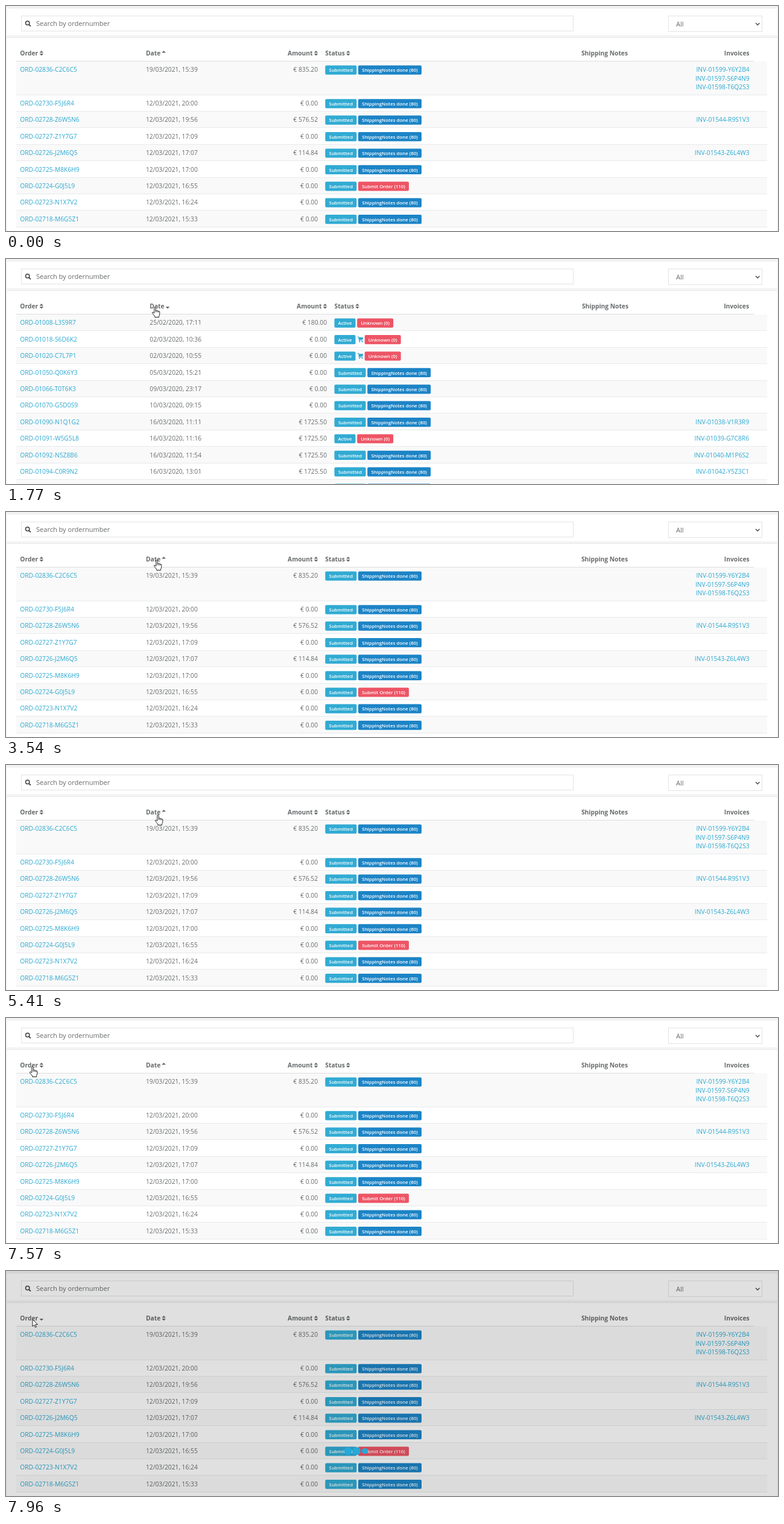
Write an HTML page that moves like this. It is 1280 px wide and 373 px high and loops after 8 s.

```html
<!DOCTYPE html>
<html lang="en">
<head>
<meta charset="utf-8">
<title>Orders</title>
<style>
  html, body { margin: 0; width: 100%; height: 100%; overflow: hidden; background: #f3f3f4; }
  svg { display: block; font: 10.25px "Open Sans", sans-serif; fill: #676a6c; }
  .end { text-anchor: end; }
  .head { font-weight: 700; }
  .link { fill: #2ba8d0; }
  .badge { font-size: 7.85px; font-weight: 600; fill: #fff; text-anchor: middle; }
  .field { font-size: 11.04px; }
  .box { fill: #fff; stroke: #e2e3e4; }
  .cursor path { fill: #fff; stroke: #222; stroke-width: 1; stroke-linejoin: round; }
</style>
</head>
<body>
<svg width="1280" height="373" viewBox="0 0 1280 373">
  <rect width="1280" height="373" fill="#f3f3f4"/>
  <path d="M1.5 4H1278.5V48.5H1.5ZM1.5 53H1278.5V373H1.5Z" fill="#fff"/>
  <path d="M1.5 3.5H1278.5M1.5 52.5H1278.5" stroke="#e7eaec"/>
  <rect class="box" x="25.5" y="16.5" width="915" height="25"/>
  <rect class="box" x="1098.5" y="16.5" width="155" height="26"/>
  <g fill="none" stroke="#4a4c4e">
    <circle cx="35.7" cy="28.3" r="3.2" stroke-width="1.6"/>
    <path d="M38 30.7L41 33.6" stroke-width="2"/>
    <path d="M1243 28.3L1246.2 31.5L1249.4 28.3" stroke-width="1.5"/>
  </g>
  <text class="field" x="50" y="33">Search by ordernumber</text>
  <text class="field" x="1111" y="34">All</text>
  <g id="table"></g>
  <g id="loader">
    <rect width="1280" height="373" opacity=".12" fill="#000"/>
    <g fill="#25a9d9">
      <circle cx="567" cy="298.5"/><circle cx="581" cy="298.5"/><circle cx="595" cy="298.5"/>
    </g>
  </g>
  <g id="cursor" class="cursor">
    <path id="arrow" d="M0 0V12L2.8 9.4L4.6 13.5L6.4 12.7L4.6 8.7H8.5Z"/>
    <path id="hand" d="M-1.2 1.2Q0 -.6 1.2 1.2V6.2Q2.4 5.4 3.4 6.6Q4.8 6 5.6 7.4Q7.6 6.8 7.8 9V12Q7.6 14 6.6 15.5V17.5H-.2V16Q-2.5 13.5 -4.6 10.3Q-4.6 8.6 -2.8 9.4L-1.2 10.8ZM1.2 6.2V9M3.5 6.8V9.3M5.6 7.5V9.5"/>
  </g>
</svg>
<script>
const LOOP = 8000, STEP = 77, ROW = 27.4, LINE = 14.1, LOADING = 7640;
const $ = id => document.getElementById(id);

// label, width, colour
const badges = {
  S: ['Submitted', 52, '#31abd3'],
  A: ['Active', 35, '#31abd3'],
  N: ['ShippingNotes done (80)', 105, '#1c84c6'],
  R: ['Submit Order (110)', 84, '#ed5565'],
  U: ['Unknown (0)', 60, '#ed5565']
};

const newest = {
  date: 232, amount: 517, status: 529.3, notes: 1031, invoice: 1232.7,
  rows: `02836-C2C6C5|19/03/2021, 15:39|835.20|SN|01599-Y6Y2B4 01597-S6P4N9 01598-T6Q2S3
02730-F5J6R4|12/03/2021, 20:00|0.00|SN
02728-Z6W5N6|12/03/2021, 19:56|576.52|SN|01544-R9S1V3
02727-Z1Y7G7|12/03/2021, 17:09|0.00|SN
02726-J2M6Q5|12/03/2021, 17:07|114.84|SN|01543-Z6L4W3
02725-M8K6H9|12/03/2021, 17:00|0.00|SN
02724-G0J5L9|12/03/2021, 16:55|0.00|SR
02723-N1X7V2|12/03/2021, 16:24|0.00|SN
02718-M6G5Z1|12/03/2021, 15:33|0.00|SN`
};
const oldest = {
  date: 238.3, amount: 532, status: 544.5, notes: 1032, invoice: 1232,
  rows: `01008-L3S9R7|25/02/2020, 17:11|180.00|AU
01018-S6D6K2|02/03/2020, 10:36|0.00|ACU
01020-C7L7P1|02/03/2020, 10:55|0.00|ACU
01050-Q0K6Y3|05/03/2020, 15:21|0.00|SN
01066-T0T6K3|09/03/2020, 23:17|0.00|SN
01070-G5D0S9|10/03/2020, 09:15|0.00|SN
01090-N1Q1G2|16/03/2020, 11:11|1725.50|SN|01038-V1R3R9
01091-W5G5L8|16/03/2020, 11:16|1725.50|AU|01039-G7C8R6
01092-N5Z8B6|16/03/2020, 11:54|1725.50|SN|01040-M1P6S2
01094-C0R9N2|16/03/2020, 13:01|1725.50|SN|01042-Y5Z3C1
|||SN`
};

const text = (x, y, str, cls = '') => `<text x="${x}" y="${y}" class="${cls}">${str}</text>`;
const rect = (x, y, w, h, fill, rx = 0) =>
  `<rect x="${x}" y="${y}" width="${w}" height="${h}" fill="${fill}" rx="${rx}"/>`;

function sortIcon(x, dir) {
  const up = `M${x - 3.3} 77.4h6.6l-3.3 -3.4Z`;
  const down = `M${x - 3.3} 79h6.6l-3.3 3.4Z`;
  return `<path d="${dir == 'up' ? up : dir == 'down' ? down : up + down}"/>`;
}

const cart = (x, cy) => `<g transform="translate(${x + .5} ${cy - 4.5})" class="link">
  <path d="M0 0H2L2.4 1.2H9.5L8.8 5.2L3.2 5.9L3.4 6.6H8.8V7.4H2.6L1.4 1H0Z"/>
  <circle cx="3.4" cy="8.4" r="1"/><circle cx="8" cy="8.4" r="1"/></g>`;

function statusCell(x, cy, kinds) {
  let out = '';
  for (const kind of kinds) {
    let w = 9.8;
    if (kind == 'C') out += cart(x, cy);
    else {
      const [label, width, fill] = badges[kind];
      w = width;
      out += rect(x, cy - 7.1, w, 15.2, fill, 2) + text(x + w / 2, cy + 3.7, label, 'badge');
    }
    x += w + 2.7;
  }
  return out;
}

function tableView(t, orderSort, dateSort) {
  let top = 92, out = '';
  t.rows.split('\n').forEach((row, i) => {
    const [order, date, amount, kinds, inv] = row.split('|');
    const invoices = inv ? inv.split(' ') : [];
    const height = ROW + LINE * Math.max(0, invoices.length - 1);
    const cy = top + ROW / 2, base = cy + 3.7, y = Math.round(top);
    if (i % 2 == 0) out += rect(17, y, 1245, Math.round(top + height) - y, '#f9f9f9');
    out += rect(17, Math.round(top + height) - 1, 1245, 1, '#e7eaec');
    if (order) {
      out += text(23.3, base, 'ORD-' + order, 'link') + text(t.date, base, date) +
        text(t.amount, base, '€ ' + amount, 'end');
    }
    out += statusCell(t.status, cy, kinds);
    invoices.forEach((id, k) => out += text(t.invoice, base + k * LINE, 'INV-' + id, 'link end'));
    top += height;
  });
  const head = (x, str, cls = '') => text(x, 82, str, 'head ' + cls);
  return out + rect(17, 91, 1223, 1, '#ddd') +
    head(23.3, 'Order') + sortIcon(58.8, orderSort) +
    head(t.date, 'Date') + sortIcon(t.date + 29.6, dateSort) +
    head(t.amount - 8.5, 'Amount', 'end') + sortIcon(t.amount - 3, 'both') +
    head(t.status, 'Status') + sortIcon(t.status + 38, 'both') +
    head(t.notes, 'Shipping Notes', 'end') + head(t.invoice, 'Invoices', 'end');
}

const views = {
  newest: tableView(newest, 'both', 'up'),
  oldest: tableView(oldest, 'both', 'down'),
  loading: tableView(newest, 'down', 'both')
};

// start, number of steps, first x, y, last x, y
const moves = [
  [70, 5, 748, 238, 304, 87],
  [530, 7, 300, 86, 246, 79],
  [1700, 2, 247, 79, 249, 79],
  [3540, 1, 250, 79, 250, 79],
  [5410, 10, 252, 82, 1216, 358],
  [6640, 8, 1034, 318, 20, 90],
  [7256, 3, 28, 84, 40, 79],
  [7490, 2, 42, 79, 44, 80]
];
const smooth = u => u * u * (3 - 2 * u);

function cursorAt(t) {
  if (t < 70 || (t >= 6180 && t < 6640)) return null;
  const [start, n, x0, y0, x1, y1] = moves.findLast(m => m[0] <= t);
  const k = Math.min(n - 1, Math.floor((t - start) / STEP));
  const u = smooth(k / Math.max(1, n - 1));
  return [x0 + (x1 - x0) * u, y0 + (y1 - y0) * u];
}

// Dot grows until 40 % of its cycle, shrinks until 80 %, then rests.
function bounce(ms) {
  const p = ms % 1400 / 560;
  return p < 1 ? smooth(p) : p < 2 ? smooth(2 - p) : 0;
}

const show = (el, on) => el.style.display = on ? '' : 'none';
const dots = document.querySelectorAll('#loader circle');
let current;

function draw(t) {
  const loading = t >= LOADING;
  const view = loading ? 'loading' : t >= 1140 && t < 2070 ? 'oldest' : 'newest';
  if (view != current) $('table').innerHTML = views[current = view];

  show($('loader'), loading);
  if (loading) {
    const age = Math.floor((t - LOADING) / 80) * 80 + 30;
    dots.forEach((dot, i) => dot.setAttribute('r', 7 * bounce(age + 320 - 160 * i)));
  }

  const pos = cursorAt(t);
  show($('cursor'), pos);
  if (pos) {
    const [x, y] = pos, hand = !loading && x < 268 && y < 97;
    $('cursor').setAttribute('transform', `translate(${x} ${y})`);
    show($('hand'), hand);
    show($('arrow'), !hand);
  }
}

const began = performance.now();
function tick() {
  draw((performance.now() - began) % LOOP);
  requestAnimationFrame(tick);
}
tick();
</script>
</body>
</html>
```
